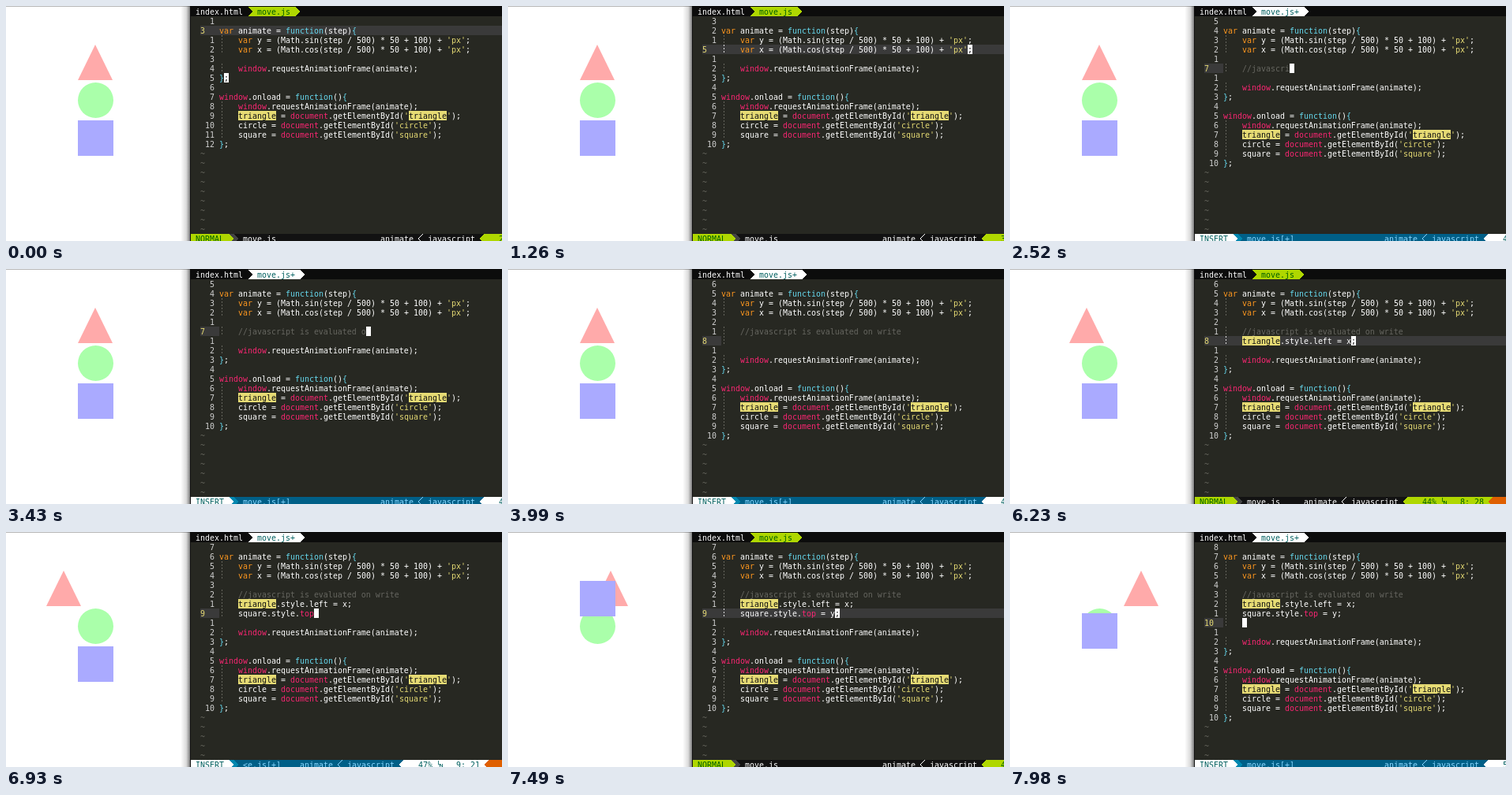
These frames come from a looping animation (628 px wide and 298 px high, 8 s). An HTML page:

```html
<!DOCTYPE html>
<html lang="en">
<head>
<meta charset="utf-8">
<title>Live code editing</title>
<style>
  html, body { margin: 0; width: 100%; height: 100%; overflow: hidden; background: #fff; }
  svg { display: block; width: 628px; height: 298px; }
  text { font: 9.966px "DejaVu Sans Mono", monospace; white-space: pre; }
</style>
</head>
<body>
<svg viewBox="0 0 628 298">
  <defs>
    <linearGradient id="shade">
      <stop offset="0" stop-color="#000" stop-opacity="0"/>
      <stop offset=".6" stop-color="#000" stop-opacity=".14"/>
      <stop offset="1" stop-color="#000" stop-opacity=".5"/>
    </linearGradient>
  </defs>
  <rect width="233" height="1" fill="#b8b8b8"/>
  <path id="triangle" d="M22 0L44 45H0z" fill="#faa"/>
  <circle cx="113.5" cy="119.5" r="22.5" fill="#afa"/>
  <rect id="square" x="91" width="45" height="45" fill="#aaf"/>
  <rect x="221" width="12" height="298" fill="url(#shade)"/>
  <g id="editor"></g>
</svg>
<script>
const LOOP = 8000, TICK = 70;
const CELL = 6, ROW = 12, LEFT = 234, GUTTER = 246, CODE = 270, STATUS_Y = 289;
const FIRST_LINE = 2;

const head = [
  "",
  "var animate = function(step){",
  "    var y = (Math.sin(step / 500) * 50 + 100) + 'px';",
  "    var x = (Math.cos(step / 500) * 50 + 100) + 'px';"
];
const tail = [
  "",
  "    window.requestAnimationFrame(animate);",
  "};",
  "",
  "window.onload = function(){",
  "    window.requestAnimationFrame(animate);",
  ...["triangle", "circle", "square"].map(id => `    ${id} = document.getElementById('${id}');`),
  "};"
];

// Each entry changes part of the editor state at its time.
const steps = [
  [0, { line: 3, insert: false, dirty: false, added: 0, cursor: [8, 1], warn: false, scope: "animate" }],
  [70, { cursor: true }],
  [700, { cursor: false }],
  [1190, { line: 4, cursor: true }],
  [1260, { line: 5 }],
  [1330, { line: 6, insert: true, dirty: true, added: 1 }],
  [1400, { line: 7, added: 2 }],
  [3920, { line: 8, added: 3 }],
  [3990, { cursor: false }],
  [4060, { cursor: true }],
  [4970, { scope: "window.onload" }],
  [5320, { insert: false }],
  [6020, { cursor: false }],
  [6230, { dirty: false, cursor: true, warn: true, scope: "animate" }],
  [6300, { line: 9, insert: true, dirty: true, added: 4 }],
  [7280, { insert: false }],
  [7350, { cursor: false }],
  [7490, { dirty: false, cursor: true, warn: false }],
  [7770, { line: 10, insert: true, dirty: true, added: 5 }]
];
const TRIANGLE_START = 6230, SQUARE_START = 7490;

// Typed lines with [time, characters] points.
const typed = [
  ["", [[0, 0]]],
  ["//javascript is evaluated on write", [[1890, 0], [2520, 10], [2730, 15], [3570, 30], [3850, 34]]],
  ["triangle.style.left = x;", [[3990, 0], [4410, 8], [5250, 24]]],
  ["square.style.top = y;", [[6300, 0], [6650, 9], [6720, 9], [6930, 16], [7210, 21]]],
  ["", [[0, 0]]]
];

const themes = {
  normal: { mode: "#afd700", modeText: "#005f00", edge: "#444", bar: "#121212", barText: "#fff" },
  insert: { mode: "#fff", modeText: "#005f5f", edge: "#0087af", bar: "#005f87", barText: "#87d7ff" }
};

const syntax = /(\/\/.*)|('\w*')|\b(var)\b|(\bfunction\b|[{}])|\b(window|document|top)\b|[^\s]/g;
const colors = ["#666660", "#e6db74", "#fd971f", "#66d9ef", "#f92672"];
const PLAIN = "#fff", YELLOW = "#e6db74", CURRENT = "#3a3a3a", DIM = "#66665e";

const rowY = row => 1 + row * ROW;
const lineY = line => rowY(line - FIRST_LINE + 1);
const rect = (x, y, w, h, fill) => `<rect x="${x}" y="${y}" width="${w}" height="${h}" fill="${fill}"/>`;
const text = (x, y, str, fill) =>
  `<text x="${x}" y="${y + 10}" fill="${fill}">${str.replace(/</g, "&lt;")}</text>`;
const arrow = (x, y, dir, fill) =>
  `<path d="M${x} ${y}h${dir / 2}l${6 * dir} 6l${-6 * dir} 6h${-dir / 2}z" fill="${fill}" shape-rendering="crispEdges"/>`;
const block = (x, y, str, fill) => rect(x, y, str.length * CELL, ROW, fill) + text(x, y, str, "#111");

function countAt(points, t) {
  if (t <= points[0][0]) return 0;
  for (let i = 1; i < points.length; i++) {
    const [t0, n0] = points[i - 1], [t1, n1] = points[i];
    if (t <= t1) return Math.floor(n0 + (n1 - n0) * (t - t0) / (t1 - t0) + 1e-6);
  }
  return points[points.length - 1][1];
}

function stateAt(t) {
  const state = Object.assign({}, ...steps.filter(s => s[0] <= t).map(s => s[1]));
  const added = typed.slice(0, state.added).map(([str, points], i) => {
    const part = str.slice(0, countAt(points, t));
    const active = state.insert && head.length + i + FIRST_LINE === state.line;
    return part || active ? "    " + part : "";
  });
  state.lines = [...head, ...added, ...tail];
  return state;
}

function drawCode(str, y, guide) {
  let out = "";
  if (str.startsWith("    "))
    out += `<path d="M${CODE + 3.5} ${y}v12" stroke="${guide}" stroke-dasharray="2 2"/>`;
  // Runs of plain characters share one text element.
  let plain = "", start = 0;
  const flush = () => {
    if (plain) out += text(CODE + start * CELL, y, plain, PLAIN);
    plain = "";
  };
  for (const m of str.matchAll(syntax)) {
    const kind = m.slice(1).findIndex(Boolean);
    if (kind < 0) {
      if (plain && start + plain.length !== m.index) flush();
      if (!plain) start = m.index;
      plain += m[0];
    } else {
      flush();
      out += text(CODE + m.index * CELL, y, m[0], colors[kind]);
    }
  }
  flush();
  for (const m of str.matchAll(/triangle/g)) out += block(CODE + m.index * CELL, y, m[0], YELLOW);
  return out;
}

function drawBuffer({ lines, line, insert, cursor }) {
  let out = rect(GUTTER, lineY(line), insert ? CODE - GUTTER : 628 - GUTTER, ROW, CURRENT);
  lines.forEach((str, i) => {
    const n = i + FIRST_LINE, y = lineY(n);
    const label = String(n === line ? n : Math.abs(n - line));
    out += n === line
      ? text(GUTTER, y, label, YELLOW)
      : text(CODE - (label.length + 1) * CELL, y, label, "#d0d0d0");
    out += drawCode(str, y, n === line && !insert ? "#ddd" : DIM);
  });
  for (let row = lines.length + 1; row < 24; row++) out += text(GUTTER, rowY(row), "~", DIM);
  if (cursor) {
    const str = lines[line - FIRST_LINE];
    const [n, col] = Array.isArray(cursor) ? cursor : [line, str.length - !insert];
    out += block(CODE + col * CELL, lineY(n), lines[n - FIRST_LINE][col] || " ", "#fff");
  }
  return out;
}

function drawTabs({ dirty }) {
  const theme = dirty ? themes.insert : themes.normal;
  const name = dirty ? "move.js+" : "move.js";
  const end = 324 + name.length * CELL;
  return rect(233, 0, 395, 13, "#0c0c0c") + text(240, 1, "index.html", "#fff") +
    rect(306, 1, end - 306, ROW, theme.mode) + arrow(306, 1, 1, "#0c0c0c") +
    arrow(end, 1, 1, theme.mode) + text(318, 1, name, theme.modeText);
}

function drawStatus({ lines, line, insert, dirty, warn, scope }) {
  const { mode, modeText, edge, bar, barText } = insert ? themes.insert : themes.normal;
  const y = STATUS_Y, shift = warn ? -102 : 0;
  const name = dirty ? (warn ? "<e.js[+]" : "move.js[+]") : "move.js";
  const total = lines.length + FIRST_LINE - 1;
  const percent = Math.floor(line / total * 100) + "%";
  const column = lines[line - FIRST_LINE].length + (insert ? 1 : 0);
  const place = `${String(line).padStart(4)}:${String(column).padStart(3)}`;
  let out = rect(LEFT, y, 394, ROW, bar) +
    rect(282, y, CELL, ROW, edge) + arrow(288, y, 1, edge) +
    rect(LEFT, y, 48, ROW, mode) + arrow(282, y, 1, mode) +
    text(240, y, insert ? "INSERT" : "NORMAL", modeText) + text(300, y, name, barText) +
    text(516 + shift - scope.length * CELL, y, scope, barText) +
    `<path d="M${528 + shift} ${y}l-6 6l6 6" fill="none" stroke="${barText}"/>` +
    text(534 + shift, y, "javascript", barText) +
    arrow(606 + shift, y, -1, mode) + rect(606 + shift, y, 124, ROW, mode) +
    text(624 + shift, y, percent, modeText);
  if (warn) {
    out += `<path d="M547.5 ${y + 1}v5h3M549.5 ${y + 9}v-4l3 4v-4" fill="none" stroke="${modeText}" stroke-width=".8"/>` +
      text(552, y, place, modeText) + arrow(612, y, -1, "#df5f00") + rect(612, y, 16, ROW, "#df5f00");
  }
  return out;
}

const $ = id => document.getElementById(id);

function draw(t) {
  const phase = Math.PI + (t - 6720) / TICK / 6;
  const left = t < TRIANGLE_START ? 91 : 95 + 50 * Math.cos(phase);
  const top = t < SQUARE_START ? 145 : 110 + 50 * Math.sin(phase);
  $("triangle").setAttribute("transform", `translate(${Math.round(left)} 49)`);
  $("square").setAttribute("y", Math.round(top));
  const state = stateAt(t);
  $("editor").innerHTML = rect(233, 0, 395, 298, "#272822") + rect(233, 0, 1, 298, "#111") +
    drawTabs(state) + drawBuffer(state) + drawStatus(state);
}

const begin = performance.now();
let shown = -1;
function frame() {
  const t = Math.floor((performance.now() - begin) % LOOP / TICK) * TICK;
  if (t !== shown) draw(shown = t);
  requestAnimationFrame(frame);
}
frame();
</script>
</body>
</html>
```
